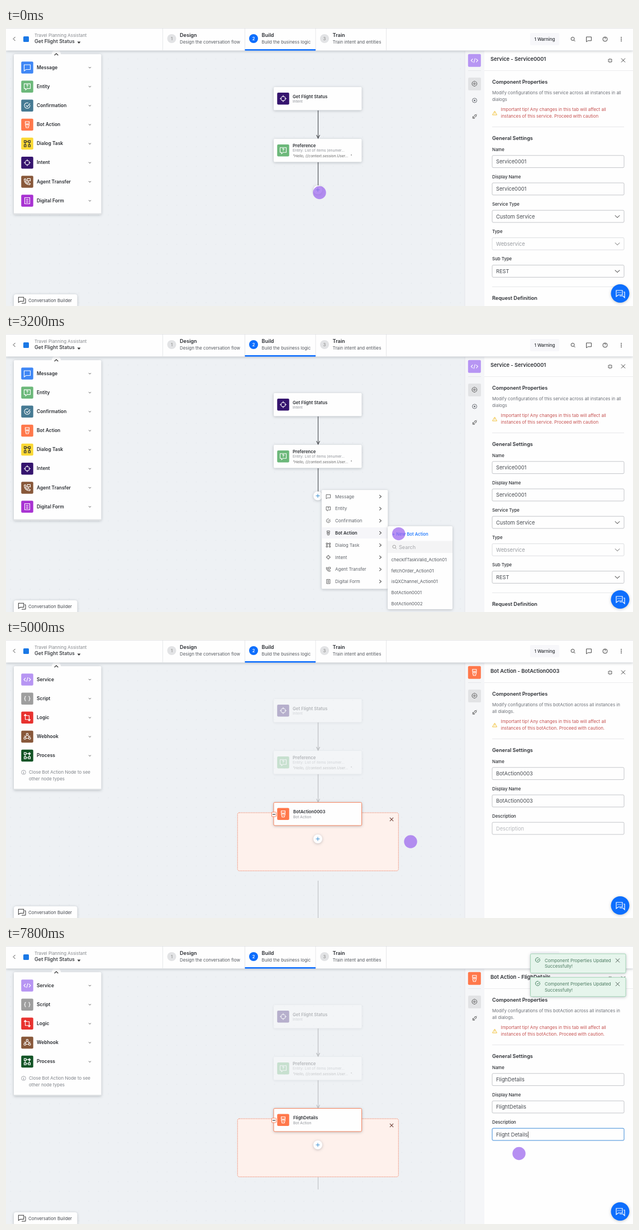
An HTML page for the animation above (8000 ms loop, 1122x499 px).

```html
<!DOCTYPE html>
<html lang="en">
<head>
<meta charset="utf-8">
<title>Conversation builder</title>
<style>
html, body { margin: 0; width: 100%; height: 100%; overflow: hidden; background: #eef1f4; }
svg { display: block; font-family: Inter, Roboto, "Liberation Sans", sans-serif; }
.card { filter: drop-shadow(0 1px 2.5px rgba(40, 50, 60, .28)); }
text { white-space: pre; }
</style>
</head>
<body>
<svg id="stage" width="1122" height="499" viewBox="0 0 1122 499"></svg>
<script>
const LOOP = 8000, STEP = 200;
const INK = '#2b2e33', GREY = '#6b6f76', BLUE = '#0d6efd', ORANGE = '#ff784b', PURPLE = '#b795f3';

// Icon outlines, centred on 0,0
const ICONS = {
  message: 'M-5.5-5H5.5V3.5H-2L-5.5 6Z',
  entity: 'M-5.5-5H5.5V3.5H0L-3 6V3.5H-5.5ZM-1.4-2Q-1.2-3.4 0-3.4Q1.5-3.3 1.3-2Q1-1.2 0-.7V.2M0 1.4V2',
  confirm: 'M4.8-1.2A5 5 0 1 1 2-4.6M-2.2-.3L0 1.8L5-4',
  bot: 'M-3.5-5.5H3.5V-1.5H-3.5ZM-1.5-3.5H-1M1-3.5H1.5M0-1.5V0M-3.5 0H3.5L2 5.5H-2L-3.5 0M-1 2.5H1',
  task: 'M-5.5-5.5h3.5v3.5h-3.5zM2-5.5h3.5v3.5h-3.5zM-5.5 2h3.5v3.5h-3.5zM2 2h3.5v3.5h-3.5zM-2-3.7H2M-3.7-2V2M3.7-2V2',
  intent: 'M4 0A4 4 0 1 1-4 0A4 4 0 1 1 4 0M0-6V-2.7M0 6V2.7M-6 0H-2.7M6 0H2.7',
  agent: 'M-5.5-4.5L-3.5-5.5L-1.8-2.5L-3-1.2Q-1.5 1.8 1 2.8L2.3 1.6L5.5 3.5L4.3 5.5Q-5 5-5.5-4.5ZM0-5.5H5.5V-1.5H3L1.5 0V-1.5H0Z',
  form: 'M-4.5-5.5H4.5V5.5H-4.5ZM-2.2-2.6H2.2M-2.2 0H2.2M-2.2 2.6H2.2',
  service: 'M-3-3L-6 0L-3 3M3-3L6 0L3 3M1.2-4L-1.2 4',
  script: 'M-2.5-4Q-4-4-4-2.5Q-4 0-5.3 0Q-4 0-4 2.5Q-4 4-2.5 4M2.5-4Q4-4 4-2.5Q4 0 5.3 0Q4 0 4 2.5Q4 4 2.5 4',
  logic: 'M-6-3.5H3.5V5.5M1.5 4L3.5 6L5.5 4M6 3.5H-3.5V-5.5M-5.5-4L-3.5-6L-1.5-4',
  webhook: 'M-1.8-4a1.8 1.8 0 1 0 3.6 0a1.8 1.8 0 1 0-3.6 0M-6 3a1.8 1.8 0 1 0 3.6 0a1.8 1.8 0 1 0-3.6 0M2.4 3a1.8 1.8 0 1 0 3.6 0a1.8 1.8 0 1 0-3.6 0M-1-2.2L-3.5 1.3M1-2.2L3.5 1.3M-2.4 3H2.4M-5.5-1H-3M3-1H5.5',
  process: 'M-5.5-5.5h3.5v3.5h-3.5zM2 2h3.5v3.5h-3.5zM-5.5 2h3.5v3.5h-3.5zM-2-3.7H3.7V2M-3.7-2V2M2-3.7l2-1.8l1.8 1.8l-1.8 1.8zM-2 3.7H2',
  down: 'M-5-2.3L0 2.4L5-2.3',
  right: 'M-1.8-3.2L1.8 0L-1.8 3.2',
  close: 'M-3.5-3.5L3.5 3.5M3.5-3.5L-3.5 3.5',
  plus: 'M-3.5 0H3.5M0-3.5V3.5',
  search: 'M2.6-.6A3 3 0 1 1-3.4-.6A3 3 0 1 1 2.6-.6M1.7 1.7L4 4',
  ring: 'M4 0A4 4 0 1 1-4 0A4 4 0 1 1 4 0',
  check: 'M3.8-1A4 4 0 1 1 1.5-3.7M-1.6-.3L0 1.2L3.8-3.2',
  gear: 'M-2-3.6L-1.3-4.3H1.3L2-3.6L3.4-2.8L4.2-1.2V1.2L3.4 2.8L2 3.6L1.3 4.3H-1.3L-2 3.6L-3.4 2.8L-4.2 1.2V-1.2L-3.4-2.8ZM1.5 0A1.5 1.5 0 1 1-1.5 0A1.5 1.5 0 1 1 1.5 0',
  plug: 'M-3.5 3.5L-2 2M-2.7-.3L.3 2.7Q-1.5 4-2.7 2.7Q-4 1.5-2.7-.3M-.7-1.7L1.7.7L2.7-.3Q4-1.7 2.7-2.7Q1.5-4 .2-2.7ZM2.7-2.7L4-4',
  shrink: 'M-4-1.3H-1.3V-4M4-1.3H1.3V-4M-4 1.3H-1.3V4M4 1.3H1.3V4',
  warn: 'M0-3.5L4 3.5H-4ZM0-1V1M0 2V2.3'
};

const PALETTE = [
  ['message', 'Message', '#3f87f5'], ['entity', 'Entity', '#6cb87a'],
  ['confirm', 'Confirmation', '#467a93'], ['bot', 'Bot Action', ORANGE],
  ['task', 'Dialog Task', '#fbd935'], ['intent', 'Intent', '#35146e'],
  ['agent', 'Agent Transfer', '#88583a'], ['form', 'Digital Form', '#a832d2']
];
const BOT_PALETTE = [
  ['service', 'Service', PURPLE], ['script', 'Script', '#9e9e9e'], ['logic', 'Logic', '#e8322f'],
  ['webhook', 'Webhook', '#88583a'], ['process', 'Process', '#135426']
];

// y is the middle of the capitals
const text = (x, y, str, size = 7.9, fill = INK, weight = 400, more = '') =>
  `<text x="${x}" y="${y + size * .36}" font-size="${size}" fill="${fill}" font-weight="${weight}" ${more}>${str}</text>`;
const rect = (x, y, w, h, fill, more = '') =>
  `<rect x="${x}" y="${y}" width="${w}" height="${h}" fill="${fill}" ${more}/>`;
const disc = (x, y, r, fill, more = '') => `<circle cx="${x}" cy="${y}" r="${r}" fill="${fill}" ${more}/>`;
const path = (d, stroke, width = 1, more = '') =>
  `<path d="${d}" fill="none" stroke="${stroke}" stroke-width="${width}" ${more}/>`;
const icon = (name, x, y, color = GREY, scale = 1, width = 1) =>
  path(ICONS[name], color, width / scale, `transform="translate(${x} ${y}) scale(${scale})"`);
const tile = (name, x, y, color, size = 21.5) =>
  rect(x - size / 2, y - size / 2, size, size, color, 'rx="2"') +
  icon(name, x, y, color === '#fbd935' ? '#333' : '#fff', 1, 1.1);

function header() {
  const step = (x, n, title, sub, on) =>
    disc(x, 19, 8, on ? BLUE : '#e2e3e5') +
    text(x, 19, n, 7.5, on ? '#fff' : '#999', 600, 'text-anchor="middle"') +
    text(x + 14.5, 13, title, 9.1, INK, 600) + text(x + 14.5, 25, sub, 7.87, '#55595f');
  return rect(0, 0, 1122, 40.5, '#fefefe', 'class="card"') + rect(0, 0, 1122, 1, '#e3e4e6') +
    path('M17-3.5', 'none') + path('M16.5 16L13 19.5L16.5 23', '#444') +
    rect(31, 15, 10, 10, '#1a78e6', 'rx="1.5"') +
    text(51, 13, 'Travel Planning Assistant', 7.9, '#85888d') +
    text(51, 24, 'Get Flight Status', 9.1, INK, 500) +
    '<path d="M127.5 24.5h6l-3 3.5z" fill="#333"/>' +
    [280, 427, 553.5, 680].map(x => rect(x, 1, 1, 39, '#e6e7e9')).join('') +
    step(296.5, 1, 'Design', 'Design the conversation flow') +
    step(443, 2, 'Build', 'Build the business logic', true) +
    step(570, 3, 'Train', 'Train intent and entities') +
    rect(427.5, 38, 126.5, 2.6, BLUE) +
    rect(938, 9, 52, 22, '#f7f7fa', 'rx="2"') + text(945.5, 20, '1 Warning', 7.9, INK, 500) +
    icon('search', 1014.5, 20, '#444') + icon('message', 1043, 20, '#444', .8) +
    icon('ring', 1072, 20, '#444') + text(1072, 20, '?', 6.5, '#444', 500, 'text-anchor="middle"') +
    [16.8, 20, 23.2].map(y => disc(1101, y, .9, '#333')).join('');
}

function sidebar(items, height) {
  return rect(14, 47, 156.5, height, '#fefefe', 'rx="2" class="card"') +
    rect(14, 45 + height, 156.5, 2, '#dfe2e4') +
    disc(90, 47, 8, '#fefefe') + path('M86.7 49L90 45.8L93.3 49', '#333', 1.2) +
    items.map(([name, label, color], i) => {
      const y = 71 + 34.15 * i;
      return tile(name, 38, y, color) + text(55, y - .4, label, 8.45, INK, 600) +
        icon('down', 150, y, '#555', .42, .9);
    }).join('');
}

function node(y, name, color, title, lines, stroke = 'none') {
  return rect(479, y, 157.5, 41.5, '#fefefe', `rx="2" stroke="${stroke}" class="card"`) +
    tile(name, 496, y + 20.7, color) + title + lines;
}
const sub = (y, str, more) => text(513, y, str, 6.64, more ? '#666' : '#8d9096', 400, more);

function flow() {
  return path('M558.5 148V198M555.5 192L558.5 198L561.5 192M558.5 241V283', '#55585c', 1.2) +
    node(106, 'intent', '#35146e', text(513, 123, 'Get Flight Status', 7.8, INK, 600), sub(132, 'Intent')) +
    node(199, 'entity', '#6cb87a', text(513, 211, 'Preference', 7.8, INK, 600),
      sub(220, 'Entity: List of items (enumer...') +
      sub(230, '"Hello, {{context.session.User...  "', 'font-style="italic"'));
}

const addButton = (y, busy, t) => disc(558, y, 8, '#fefefe', 'class="card"') +
  (busy
    ? disc(558, y, 5.5, 'none', 'stroke="#dcdfe4" stroke-width="1.3"') +
      path('M5.5 0A5.5 5.5 0 0 1-5.5 0', '#3c6d9e', 1.3, `transform="translate(558 ${y}) rotate(${t * .36})"`)
    : icon('plus', 558, y, '#3d8fd0'));

function menu(x, active) {
  return rect(x, 280, 118.5, 177.5, '#fefefe', 'rx="2" class="card"') +
    (active ? rect(x, 347, 118.5, 20, '#f6f6f9') : '') +
    PALETTE.map(([name, label], i) => {
      const y = 291.7 + 21.8 * i, on = active && i === 3;
      return icon(name, x + 12, y, '#555', .68, .85) +
        text(x + 24.3, y, label, 7.9, on ? INK : '#5d6167', on ? 600 : 400) +
        icon('right', x + 105, y, '#444', .9);
    }).join('');
}

function submenu() {
  const actions = ['checkIfTaskValid_Action01', 'fetchOrder_Action01', 'isQXChannel_Action01', 'BotAction0001', 'BotAction0002'];
  return rect(683, 345, 116, 149, '#fefefe', 'rx="2" class="card"') +
    text(691, 358.8, '+ New Bot Action', 7.8, BLUE, 500) +
    rect(683, 371.5, 116, 21.5, '#f4f4f5') + icon('search', 695, 382.3, '#888', .9, .8) +
    text(703, 382.3, 'Search', 9.1, '#a5a7ab') +
    actions.map((a, i) => text(689.5, 405 + 19.8 * i, a, 7.9, '#55595f')).join('');
}

function field(y, label, value, kind, focus) {
  const dim = kind === 'off' || kind === 'hint';
  return text(870, y - 22, label, 7.8, INK, 500) +
    rect(870, y - 11, 236, 21.8, '#fefefe', `rx="2" stroke="${focus ? '#3b8ad8' : kind === 'off' ? '#dcdde0' : '#c3c5c9'}"`) +
    text(877, y, value + (focus ? '<tspan fill="#111" dx="-.6">|</tspan>' : ''), 9.25,
      kind === 'hint' ? '#b5b7bb' : dim ? '#979a9f' : '#44484e') +
    (kind === 'off' || kind === 'list' ? icon('down', 1094, y, dim ? '#999' : '#555', .85) : '');
}

function panel(title, name, color, side, notes, fields) {
  return rect(821, 41, 35, 458, '#f5f6f8') + rect(820.5, 41, 1, 458, '#e3e6e9') +
    rect(856, 41, 266, 458, '#fefefe') + rect(856, 76, 266, 1, '#ebecee') + rect(827, 76, 23, 1, '#e4e6e9') +
    tile(name, 838.3, 58.3, color, 23) + rect(827, 89, 23, 23, '#e2e3e5', 'rx="2"') +
    icon('gear', 838.3, 100, '#555') + side +
    text(867, 56, title, 9.25, INK, 600) + icon('shrink', 1081, 58.5, '#444') + icon('close', 1104.5, 58, '#444') +
    text(870, 97, 'Component Properties', 9.1, INK, 600) +
    text(870, 116, notes[0], 7.87, GREY) + text(870, 128, notes[1], 7.87, GREY) +
    icon('warn', 874.5, 152.5, '#f2c23c') +
    text(885.5, 146, 'Important tip! Any changes in this tab will affect all', 7.93, '#c5504f') +
    text(885.5, 158, notes[2], 7.93, '#c5504f') +
    rect(870, 177, 236, 1, '#e6e7e9') + text(870, 198, 'General Settings', 9.1, INK, 600) + fields;
}

function servicePanel() {
  const side = icon('ring', 838.5, 130) + disc(838.5, 130, 1.5, GREY) + icon('plug', 838.5, 159, '#444');
  return panel('Service - Service0001', 'service', PURPLE, side, [
    'Modify configurations of this service across all instances in all', 'dialogs',
    'instances of this service. Proceed with caution'],
    field(239.8, 'Name', 'Service0001') + field(289, 'Display Name', 'Service0001') +
    field(338.2, 'Service Type', 'Custom Service', 'list') + field(387.4, 'Type', 'Webservice', 'off') +
    field(436.6, 'Sub Type', 'REST', 'list') +
    rect(870, 464, 236, 1, '#e6e7e9') + text(870, 484.7, 'Request Definition', 9.1, INK, 600));
}

function botPanel(s) {
  return panel('Bot Action - ' + s.saved, 'bot', ORANGE, icon('plug', 838.5, 130, '#444'), [
    'Modify configurations of this botAction across all instances in', 'all dialogs.',
    'instances of this botAction. Proceed with caution.'],
    field(239.8, 'Name', s.name, '', s.focus === 1) + field(289, 'Display Name', s.display, '', s.focus === 2) +
    field(338.2, 'Description', s.about || 'Description', s.about || s.focus === 3 ? '' : 'hint', s.focus === 3));
}

function botFlow(t, saved) {
  const tail = t < 5200 ? 'M558.5 432V499' : 'M558.5 415V437';
  return `<g opacity=".3">${flow()}</g>` +
    path('M558.5 148V198M555.5 192L558.5 198L561.5 192M558.5 241V291M555.5 285L558.5 291L561.5 285' + tail, '#bfc2c5', 1.1) +
    rect(414.3, 310, 288, 104.3, '#fef1ec', 'rx="3" stroke="#f0937a" stroke-dasharray="2 1"') +
    icon('close', 690, 322, '#6b3b30', .9) +
    node(291.5, 'bot', ORANGE, text(514, 308, saved, 7.8, INK, 600),
      text(514, 317.5, 'Bot Action', 6.64, '#8d9096'), '#f6845f') +
    rect(475.5, 309, 8, 8, '#fff', 'stroke="#f6845f" rx="1"') + path('M477 313H482', '#333', 1.2) +
    addButton(357);
}

function toast(y) {
  return rect(938.5, y, 170.5, 34.5, '#e6f5ec', 'rx="2" stroke="#a5d6b8" class="card"') +
    icon('check', 951.5, y + 11, '#3f7d5b') + icon('close', 1094.5, y + 12, '#4a5a52') +
    text(964, y + 12, 'Component Properties Updated', 7.93, '#4b7a60') + text(964, y + 22.5, 'Successfully!', 7.93, '#4b7a60');
}

function footer() {
  return rect(14, 478, 113.5, 24, '#fefefe', 'rx="4" class="card"') +
    icon('message', 27, 487.5, '#333', .85) + path('M28 494H35V486H33', '#333') +
    text(40, 489.5, 'Conversation Builder', 7.95, '#44484e') +
    disc(1099, 476.5, 16.5, BLUE, 'class="card"') +
    path('M1092 471H1103V479H1096L1092 482ZM1105 474H1107V484L1104 481H1098', '#fff', 1.2) +
    [1095, 1097.5, 1100].map(x => disc(x, 475, .8, '#fff')).join('');
}

const CURSOR = [
  [0, 561, 295.5], [1400, 561, 295.5], [1600, 569, 307.5], [2100, 606, 349], [2600, 677, 354.5],
  [3700, 724, 362], [5600, 724, 362], [5800, 840, 315], [6000, 930, 277.5], [6200, 925, 246],
  [7000, 925, 246], [7200, 918, 292], [7400, 917, 342], [7600, 918, 372.5], [LOOP, 918, 372.5]
];
function cursorAt(t) {
  const i = CURSOR.findIndex(k => k[0] > t), [t0, x0, y0] = CURSOR[i - 1], [t1, x1, y1] = CURSOR[i];
  const p = (t - t0) / (t1 - t0);
  return [x0 + (x1 - x0) * p, y0 + (y1 - y0) * p];
}

function formAt(t) {
  const done = t >= 7200;
  return {
    name: t < 6400 ? 'BotAction0003' : t < 6600 ? 'Fligh' : 'FlighDetails',
    saved: done ? 'FlighDetails' : 'BotAction0003',
    display: t < 7200 ? 'BotAction0003' : t < 7400 ? 'Flight' : 'FlightDetails',
    about: t < 7600 ? '' : t < 7800 ? 'Flight' : 'Flight Details',
    focus: t < 6200 ? 0 : t < 7200 ? 1 : t < 7600 ? 2 : 3
  };
}

function scene(t) {
  const [cx, cy] = cursorAt(t), form = formAt(t), inBot = t >= 4800;
  let out = '<defs><pattern id="dots" width="17.5" height="17.5" patternUnits="userSpaceOnUse">' +
    disc(8, 3, .6, '#d6dbe1') + '</pattern></defs>' +
    rect(0, 0, 1122, 499, '#eef1f4') + rect(0, 40, 821, 459, 'url(#dots)');
  if (inBot) {
    out += botFlow(t, form.saved) + botPanel(form) + sidebar(BOT_PALETTE, 222) +
      icon('ring', 31.5, 237.5, '#8d9096', .95, .8) + path('M31.5 237V240M31.5 235V235.8', '#8d9096') +
      text(41, 237.5, 'Close Bot Action Node to see', 7.95, '#7d8187') + text(41, 249.5, 'other node types', 7.95, '#7d8187');
  } else {
    out += flow() + addButton(290.5, t >= 4000, t) + servicePanel() + sidebar(PALETTE, 287.5);
    if (t >= 200) out += `<g opacity="${t < 400 ? .6 : 1}">${menu(t < 1800 ? 565.5 : 564.8, t >= 2200)}</g>`;
    if (t >= 2400) out += submenu();
  }
  out += header() + footer();
  if (t >= 7200) out += toast(14);
  if (t >= 7600) out += toast(56.3);
  out += disc(cx, cy, 11.7, '#9e6aee', 'opacity=".75"');
  if (t === 2600) out += disc(cx, cy, 2.6, '#d9c6fa');
  return out;
}

const stage = document.getElementById('stage');
let shown = -1;
function draw() {
  const t = Math.floor(performance.now() % LOOP / STEP) * STEP;
  if (t !== shown) stage.innerHTML = scene(shown = t);
  requestAnimationFrame(draw);
}
draw();
</script>
</body>
</html>
```
